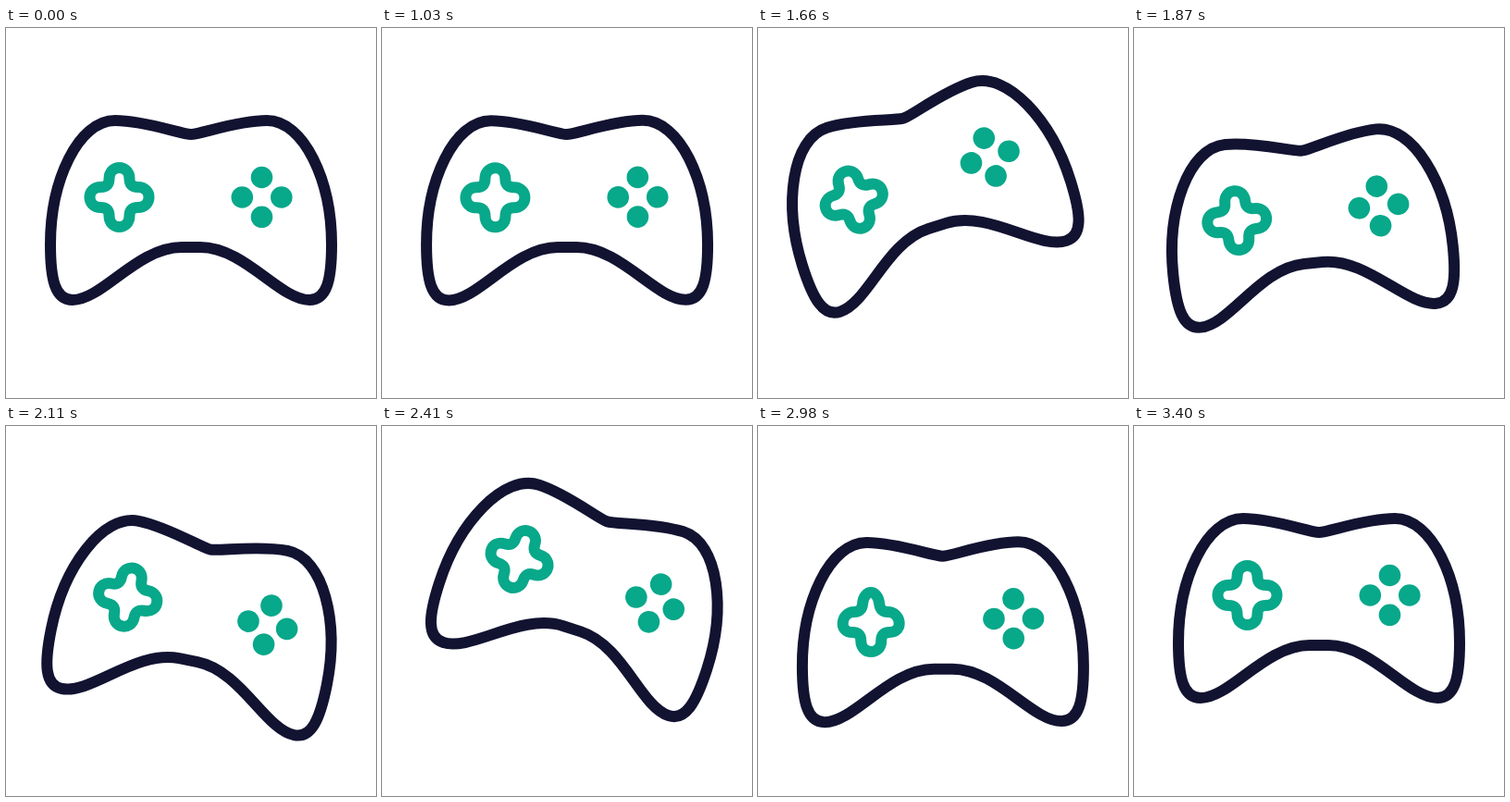
Write an HTML page with a canvas that moves like this. It is 400 px wide and 400 px high and loops after 3.43 s.

```html
<!DOCTYPE html>
<html lang="en">
<head>
<meta charset="utf-8">
<title>Game controller</title>
<style>
  html, body { margin: 0; width: 100%; height: 100%; overflow: hidden; background: #fff; }
  canvas { display: block; width: 400px; height: 400px; }
</style>
</head>
<body>
<canvas id="stage" width="400" height="400"></canvas>
<script>
const ctx = document.getElementById('stage').getContext('2d');
const LOOP = 3430, START = 1030, STEP = 30;
const NAVY = '#121331', GREEN = '#08a88a';
const PIVOT = 200;

const body = new Path2D(`M200 115 C190 115 150 100 118 100 C78 100 48 165 48 234
  C48 272 53 294 72 294 C104 294 142 237 190 237 L210 237
  C258 237 296 294 328 294 C347 294 352 272 352 234
  C352 165 322 100 282 100 C250 100 210 115 200 115 Z`);

// time, x, y, tilt in degrees
const pose = [
  [1010, 0, 0, 0],
  [1250, -4, -1, -11],
  [1535, -14, -32, -18.2],
  [1660, -17.2, -21.3, -17.4],
  [1800, -14.5, 5, -10.5],
  [1950, -4, 25, 0],
  [2110, 4.4, 16.9, 11.3],
  [2300, 13, -3, 17],
  [2450, 17.5, -20, 18],
  [2590, 17, -30, 18],
  [2740, 13, -11, 12.6],
  [2990, -0.3, 25.8, -0.3],
  [3400, 0, 0, 0]
];

// time, push of the pad to the right and down
const push = [[2560, 0, 0], [2740, 1.5, 0.4], [2980, 0, 3], [3190, 0, 0]];

// time, scale of the top button, scale of the bottom button
const press = [[2540, 1, 1], [2690, 0.72, 1], [2740, 0.83, 0.78], [2780, 0.93, 0.7], [2930, 1, 1]];

function slope(keys, i, c) {
  if (i === 0 || i === keys.length - 1) return 0;
  const [a, b, d] = [keys[i - 1], keys[i], keys[i + 1]];
  if ((b[c] - a[c]) * (d[c] - b[c]) <= 0) return 0;
  return (d[c] - a[c]) / (d[0] - a[0]);
}

// Smooth cubic through the keys, level at turning points
function track(keys, t, c) {
  const last = keys.length - 1;
  if (t <= keys[0][0]) return keys[0][c];
  if (t >= keys[last][0]) return keys[last][c];
  const i = keys.findIndex(k => k[0] > t) - 1;
  const a = keys[i], b = keys[i + 1];
  const span = b[0] - a[0], u = (t - a[0]) / span, v = 1 - u;
  return v * v * (1 + 2 * u) * a[c] + u * u * (3 - 2 * u) * b[c]
    + span * u * v * (v * slope(keys, i, c) - u * slope(keys, i + 1, c));
}

function drawPad(px, py) {
  const point = (x, y, turn) => {
    for (let i = 0; i < turn; i++) [x, y] = [-y, x];
    // The arm opposite the push becomes narrower
    const narrowX = 1 - Math.max(0, -y * py) * 0.003;
    const narrowY = 1 - Math.max(0, -x * px) * 0.003;
    return [122.5 + px + x * narrowX, 183 + py + y * narrowY];
  };
  ctx.beginPath();
  ctx.moveTo(...point(-11, -20, 0));
  for (let k = 0; k < 4; k++) {
    ctx.bezierCurveTo(...point(-11, -36, k), ...point(11, -36, k), ...point(11, -20, k));
    ctx.quadraticCurveTo(...point(11, -11, k), ...point(20, -11, k));
  }
  ctx.closePath();
  ctx.strokeStyle = GREEN;
  ctx.stroke();
}

function drawButton(x, y, scale) {
  ctx.beginPath();
  ctx.arc(x, y, 11.8 * scale, 0, Math.PI * 2);
  ctx.fillStyle = GREEN;
  ctx.fill();
}

function draw(t) {
  ctx.fillStyle = '#fff';
  ctx.fillRect(0, 0, 400, 400);
  ctx.save();
  ctx.translate(PIVOT + track(pose, t, 1), PIVOT + track(pose, t, 2));
  ctx.rotate(track(pose, t, 3) * Math.PI / 180);
  ctx.translate(-PIVOT, -PIVOT);
  ctx.lineWidth = 12;
  ctx.lineJoin = 'round';
  ctx.strokeStyle = NAVY;
  ctx.stroke(body);
  drawPad(track(push, t, 1), track(push, t, 2));
  drawButton(276.5, 161.5, track(press, t, 1));
  drawButton(276.5, 204.3, track(press, t, 2));
  drawButton(255.3, 183, 1);
  drawButton(297.8, 183, 1);
  ctx.restore();
}

const origin = performance.now();
function frame() {
  const t = (performance.now() - origin) % LOOP;
  draw(t < START ? 0 : START + Math.floor((t - START) / STEP) * STEP);
  requestAnimationFrame(frame);
}
frame();
</script>
</body>
</html>
```
